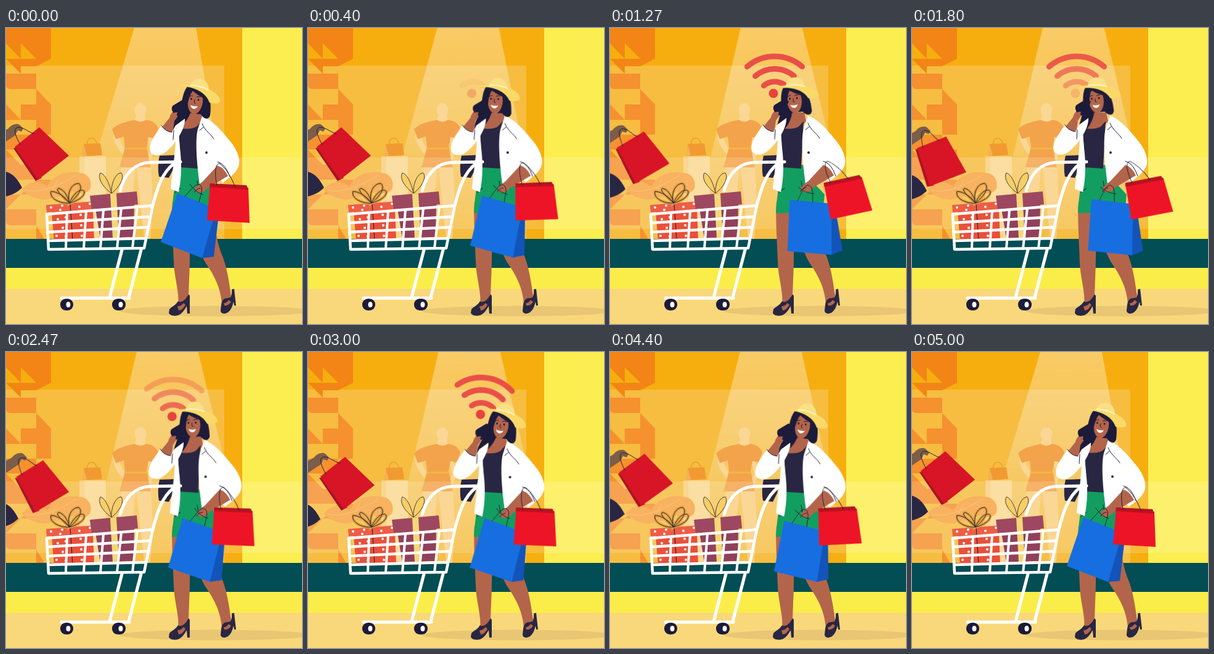
An HTML page for the animation above (5.07 s loop, 480 by 480 pixels).

```html
<!DOCTYPE html>
<html lang="en">
<head>
<meta charset="utf-8">
<title>Shopping</title>
<style>
html, body { margin: 0; width: 100%; height: 100%; overflow: hidden; background: #f6ae0f; }
svg { display: block; width: 100vw; height: 100vh; }

.sway, .swing, .lean { animation: 5070ms cubic-bezier(.37, 0, .63, 1) infinite; }

/* The body leans to pose a, then to pose b, then back to rest. */
.lean { animation-name: lean; }
@keyframes lean {
  0%, 100% { transform: none; }
  18%, 41% { transform: var(--a); }
  63%, 80% { transform: var(--b); }
}
/* The carried bags swing out twice, a and c, and hang at b in between. */
.swing { animation-name: swing; }
@keyframes swing {
  0%, 99.3%, 100% { transform: none; }
  20%, 31.6% { transform: var(--a); }
  52.3%, 56% { transform: var(--b); }
  74% { transform: var(--c); }
}
/* The passer-by lets the bag swing once and sinks slowly back. */
.sway { animation-name: sway; }
@keyframes sway {
  0%, 15.8%, 98%, 100% { transform: none; }
  35.5% { transform: var(--a); }
  48.7% { transform: var(--b); }
  59.2% { transform: var(--c); }
  75% { transform: var(--d); }
}
#cone {
  transform-origin: 258px 0;
  --a: translate(3px, 0) rotate(-3.7deg); --b: translate(3px, 0) rotate(-3.5deg);
}
#cloth {
  --a: translate(-2px, 5px); --b: translate(-6px, 11px);
  --c: translate(-6px, 12px); --d: translate(-5px, 8px);
}
#sideArm {
  --a: translate(2px, 4px); --b: translate(6px, 8px);
  --c: translate(6px, 8px); --d: translate(4px, 6px);
}
#sideBag {
  transform-origin: 17px 165px;
  --a: translate(2px, 4px) rotate(17deg); --b: translate(6px, 10px) rotate(7deg);
  --c: translate(6px, 9px); --d: translate(4px, 5px) rotate(5deg);
}
#torso, #button { --a: translate(-3px, 0); --b: translate(3px, 1px); }
#phoneArm { --a: translate(-4px, -1px); --b: translate(3px, 0); }
#head {
  transform-origin: 300px 150px;
  --a: translate(-1px, -1px) rotate(-13deg); --b: translate(6px, 1px) rotate(2deg);
}
#bagArm { --a: translate(3px, -1px); --b: translate(5px, 2px); }
#redBag {
  transform-origin: 347px 222px;
  --a: translate(7px, -4px) rotate(-15.5deg); --b: translate(6px, 0) rotate(0deg);
  --c: translate(7px, 0) rotate(-12.5deg);
}
#blueBag {
  transform-origin: 313px 258px;
  --a: translate(9px, 1px) rotate(-16.5deg); --b: translate(8px, 0) rotate(-1.2deg);
  --c: translate(6px, 3px) rotate(-15deg);
}
#signal {
  transform-origin: 268px 112px;
  --a: translate(-1px, 0); --b: translate(14px, -5px) rotate(7deg);
}
#fade { animation: fade 5070ms linear infinite; }
@keyframes fade { 0%, 66% { opacity: 1; } 80%, 98% { opacity: 0; } 100% { opacity: 1; } }
.wave {
  animation: wave 5070ms linear infinite backwards;
  animation-delay: calc(var(--i) * 120ms);
}
@keyframes wave {
  0%, 4.9% { opacity: 0; } 15.8%, 27.6% { opacity: 1; }
  37.4%, 37.9% { opacity: 0; } 48.7%, 85% { opacity: 1; }
  86%, 100% { opacity: 0; }
}
.line { fill: none; stroke: #1b1a35; stroke-width: 1; stroke-linecap: round; }
.rail { fill: none; stroke: #fff; stroke-width: 4.5; stroke-linecap: round; stroke-linejoin: round; }
.navy { fill: #292643; }
.hair { fill: #1d1b3a; }
.skin { fill: #b3654b; }
.white { fill: #fff; }
</style>
</head>
<body>
<svg viewBox="0 0 480 480">
  <defs>
    <clipPath id="shop"><path d="M0 0H383V342H0Z"/></clipPath>
    <linearGradient id="beam" x1="0" y1="0" x2="0" y2="1">
      <stop offset="0" stop-color="#fff" stop-opacity=".38"/>
      <stop offset=".5" stop-color="#fff" stop-opacity=".24"/>
      <stop offset="1" stop-color="#fff" stop-opacity="0"/>
    </linearGradient>
  </defs>

  <!-- shop front -->
  <path fill="#f6ae0f" d="M0 0H383V342H0Z"/>
  <path fill="#fcee50" d="M383 0H480V342H383Z"/>
  <path fill="#f6bd40" d="M0 61H354V342H0Z"/>
  <path fill="#f38516" d="M0 0H73V25H0ZM0 25H24V50ZM24 25H73V50H49ZM0 50H24V74ZM24 50H73L49 62H24Z"/>
  <g fill="#f58b2d" opacity=".88">
    <path d="M0 74H49V99H7Q0 99 0 92ZM49 99L73 124H49ZM0 124L24 149H0ZM24 124H73V173H49V149H24Z"/>
    <path d="M0 173H49V197H0ZM24 197H73V222H49ZM0 197L24 222H0ZM0 222H49V246H0ZM49 246H73V270H24ZM0 270H24L0 294ZM0 294H49V320H7Q0 320 0 312ZM49 320L62 342H49Z"/>
  </g>

  <g clip-path="url(#shop)">
    <path id="cone" class="lean" fill="url(#beam)" d="M214 -20H304.600L368 345H104Z"/>
  </g>

  <path fill="#f8cf7c" d="M119 208H162V342H119Z"/>
  <path fill="#fad88f" d="M127 208H162V342H127Z"/>
  <path fill="#f19a31" d="M126 188L153 187L156 206L124 208Z"/>
  <path fill="none" stroke="#f19a31" stroke-width="1.5" d="M131 190C132 175 144 175 148 189"/>
  <path fill="#f5b159" d="M124 208L126 188L131 207Z"/>
  <path fill="#f6a342" d="M26 262C38 246 55 248 67 257C75 239 98 230 120 235C133 236 140 247 137 260C132 270 118 270 108 265C98 272 88 274 78 274C63 283 37 276 26 262Z"/>
  <path class="line" style="stroke:#f6bd60" d="M32 263Q62 271 113 239M70 271L84 246"/>

  <!-- mannequin -->
  <g fill="#fad795">
    <ellipse cx="218" cy="133" rx="9.5" ry="11"/>
    <path d="M213 138H225L227 153H207Z"/>
    <path d="M174 173C175 192 187 199 193 212L199 206C192 193 185 187 184 174ZM235 173L241 199L233 216L228 211L234 198L229 175Z"/>
    <path fill="#f9cf80" d="M186 220H210L205 280L200 342H189ZM211 220H235L238 280L234 342H224Z"/>
  </g>
  <path fill="#f3a34b" d="M172 164C181 155 195 152 209 149Q218 155 227 149C236 150 244 154 247 163L241 179L231 177L228 193L235 226H184L193 194L191 176L178 180Z"/>
  <path fill="#f6bd40" opacity=".7" d="M192 194H229L230 197H191Z"/>

  <path class="white" opacity=".16" d="M0 210H480V326H0Z"/>

  <!-- street -->
  <path fill="#034d55" d="M0 342H480V389H0Z"/>
  <path fill="#fbed49" d="M0 389H480V423H0Z"/>
  <path fill="#f8d87a" d="M0 423H480V480H0Z"/>
  <ellipse cx="340" cy="459" rx="156" ry="8.500" fill="#e9c673"/>

  <!-- passer-by -->
  <path id="cloth" class="sway navy" d="M-10 226L0 233C13 237 20 247 26 259C18 267 9 271 0 273L-10 276Z"/>
  <path id="sideArm" class="sway" fill="#7b5d48" d="M-12 172L4 163C8 157 17 154 22 157L28 163L25 168L19 166L15 174L-12 192Z"/>
  <g id="sideBag" class="sway">
    <path fill="#a61421" d="M12 195L22 194L58 243L48 248Z"/>
    <path fill="#d81427" d="M14 193L54 161L102 207L52 246Z"/>
    <path class="line" d="M23 189C14 173 11 162 20 161C29 161 36 169 45 171"/>
  </g>

  <!-- gifts -->
  <path fill="#e9503a" d="M74 298L141 293L143 343L78 345Z"/>
  <path fill="#ee5d45" d="M65 287L144 281L146 293L66 299Z"/>
  <path fill="none" stroke="#fff" stroke-width="4" stroke-linecap="round" d="M73 291h0M88 295h0M91 288h0M119 290h0M136 285h0M84 310h0M92 324h0M82 337h0M97 307h0M97 338h0M121 303h0M134 311h0M122 320h0M136 328h0M123 337h0"/>
  <path class="line" d="M104 284L108 344"/>
  <g fill="none">
    <path id="bowA" stroke="#dca044" stroke-width="4" d="M103 284C87 285 70 276 73 265C83 265 97 274 103 284C88 270 79 262 86 260C95 263 101 274 103 284C98 266 107 252 118 252C127 260 114 275 103 284C110 266 123 259 127 265C128 274 114 281 103 284"/>
    <use href="#bowA" class="line" style="stroke-width:1"/>
    <path stroke="#2f2430" d="M103 284C87 285 70 276 73 265C83 265 97 274 103 284C88 270 79 262 86 260C95 263 101 274 103 284C98 266 107 252 118 252C127 260 114 275 103 284C110 266 123 259 127 265C128 274 114 281 103 284"/>
  </g>
  <path fill="#91405c" d="M144 287L208 282L207 339L153 341Z"/>
  <path fill="#9d4860" d="M136 272L212 265L214 286L139 294Z"/>
  <path fill="#f4d777" d="M169 269L179 268L183 340H173Z"/>
  <path fill="#f5cf66" stroke="#493238" d="M171 268C157 258 148 244 153 235C162 237 169 257 171 268ZM171 268C170 254 177 235 187 235C193 244 182 260 171 268Z"/>

  <!-- legs, skirt and shoulder bag -->
  <path class="skin" d="M270 282H306C304 320 299 346 298 370C298 397 296 421 296 446L287 456L279 452C282 428 272 403 272 378C271 345 268 307 270 282Z"/>
  <path class="skin" d="M298 282H338C337 313 340 340 349 365C358 385 362 412 365 435L359 452L350 447C348 419 336 399 323 380C309 355 302 320 298 282Z"/>
  <path class="navy" d="M265 456C270 451 275 450 279 443Q287 448 296 432L298 434V463H294L293 451Q287 462 281 465C275 468 266 467 264 462Z"/>
  <path class="navy" d="M349 449C350 441 354 438 359 438L364 437Q367 431 366 424L370 423L373 450H370L369 444Q366 457 360 461C354 465 348 463 348 458Z"/>
  <path class="skin" d="M278 451Q283 452 288 446L291 449Q286 458 280 458ZM353 446Q357 447 361 441L365 444Q361 451 354 450Z"/>
  <path class="navy" d="M249 207L276 206L271 229L264 243L248 241Q245 224 249 207Z"/>
  <path fill="#139e61" d="M279 222H313C318 242 338 258 348 270L345 300L269 300C270 277 275 248 279 222Z"/>
  <path class="line" d="M310 248L313 266M283 260Q277 263 274 267"/>

  <!-- upper body -->
  <g id="torso" class="lean">
    <path class="skin" d="M297 137H318L321 151L306 170L281 164Z"/>
    <path class="navy" d="M280 162Q297 166 309 160L317 151L313 228L283 226Z"/>
    <path class="white" d="M290 147L281 163L275 177C275 199 271 224 267 261L280 266C285 242 285 218 282 194L280 170Z"/>
  </g>
  <g id="bagArm" class="lean">
    <path class="white" d="M318 143C336 149 356 174 367 188C376 201 381 215 377 225C372 237 360 244 352 251L340 238L330 249L315 260C310 227 306 183 311 164Z"/>
    <path class="skin" d="M343 223Q354 227 360 240L326 260C321 268 312 269 307 265C304 260 311 255 319 249Z"/>
    <path class="line" d="M318 155C323 168 332 171 337 180M320 161L314 166M343 217Q356 220 363 241M315 260Q309 260 306 266"/>
  </g>
  <circle id="button" class="lean navy" cx="325" cy="202" r="2"/>

  <g id="fade">
    <g id="signal" class="lean" fill="none" stroke="#ea4f47" stroke-width="9" stroke-linecap="round">
      <circle class="wave" style="--i:0" cx="266" cy="106" r="7.500" fill="#e8423c" stroke="none"/>
      <path class="wave" style="--i:1" d="M250.300 93.600A27 27 0 0 1 285.700 93.600"/>
      <path class="wave" style="--i:2" d="M236.500 78A48 48 0 0 1 299.500 78"/>
      <path class="wave" style="--i:3" d="M223.400 62.700A68 68 0 0 1 312.600 62.700"/>
    </g>
  </g>

  <g id="head" class="lean">
    <path class="hair" d="M294 95C306 90 322 95 328 108C333 121 332 132 331 142C328 150 321 148 316 140L299 138C294 151 284 162 269 167C267 153 276 146 280 134C287 119 285 107 294 95Z"/>
    <ellipse class="skin" cx="307" cy="119.500" rx="12" ry="20" transform="rotate(8 307 119.500)"/>
    <path class="hair" d="M295 96C309 96 320 102 322 115C314 111 308 106 303 102C299 106 297 114 295 121L290 121Z"/>
    <path class="line" d="M298 111Q300 109 303 110M309 112Q312 110 315 112M306 116L305 121L307 122"/>
    <ellipse class="hair" cx="300.500" cy="115" rx="1.300" ry="1.800"/>
    <ellipse class="hair" cx="312" cy="116.500" rx="1.300" ry="1.800"/>
    <path class="white" d="M299 125Q305 128 311 126.500Q308 132 304 131Q300 130 299 125Z"/>
    <path fill="#fbd968" d="M281 92C298 90 321 94 334 102C343 107 349 115 347 120C343 124 336 122 330 121C326 109 315 101 301 97C293 95 286 95 281 92Z"/>
    <path fill="#fae084" d="M299 93C302 84 311 80 319 84C326 86 329 94 329 101C320 96 310 93 299 93Z"/>
    <path fill="none" stroke="#fff1ba" stroke-width="2.5" d="M299 93Q315 93 329 101"/>
  </g>

  <g id="phoneArm" class="lean">
    <path class="skin" d="M252 162L265 146C267 137 274 132 278 134L278 144L273 151L269 181Z"/>
    <path class="hair" d="M269 133Q268 127 272 125L287 116L294 120L289 132L279 143L272 139Z"/>
    <path class="skin" d="M266 147C267 139 273 136 278 137L276 145L271 150Z"/>
    <path class="white" d="M252 158Q258 168 269 169L275 158L290 147C291 158 283 174 272 188C260 202 250 210 239 205C229 201 234 186 240 176Z"/>
    <path class="line" d="M252 158Q258 168 269 169M272 166L271 181"/>
  </g>

  <!-- carried bags -->
  <g id="blueBag" class="swing">
    <path fill="#1254b9" d="M341 293L345 303L337 371L317 373Z"/>
    <path fill="#176ee0" d="M278 268L341 293L318 373L251 347Z"/>
    <path class="line" d="M290 273C299 264 309 249 315 255C321 260 315 272 313 282M298 253C302 260 310 267 319 270"/>
  </g>
  <g id="redBag" class="swing">
    <path fill="#ee1427" d="M331 252L393 259L395 316L326 312Z"/>
    <path fill="#b71321" d="M331 252L390 255L393 262L330 258Z"/>
    <path class="line" d="M342 255C338 237 339 218 347 220C356 227 367 244 371 257"/>
  </g>

  <!-- trolley -->
  <path class="rail" d="M66 302L238 288L224 357L69 359ZM67 316L234 306M67 331L231 323M68 345L227 341"/>
  <path class="rail" style="stroke-width:4" d="M99 300L97 358M130 297L126 358M158 295L153 358M187 292L180 358M213 290L205 357"/>
  <path class="rail" style="stroke-width:5" d="M185 264C192 236 209 219 233 218L283 217M238 288C245 260 253 235 272 220M188 360L168 437M219 360L199 437M90 438H200"/>
  <g class="hair">
    <rect x="88" y="439" width="21" height="19" rx="9"/>
    <rect x="172" y="439" width="22" height="19" rx="9"/>
  </g>
  <g class="white">
    <ellipse cx="101" cy="448.500" rx="3.500" ry="4.500"/>
    <ellipse cx="186" cy="448.500" rx="3.500" ry="4.500"/>
  </g>
</svg>
</body>
</html>
```
